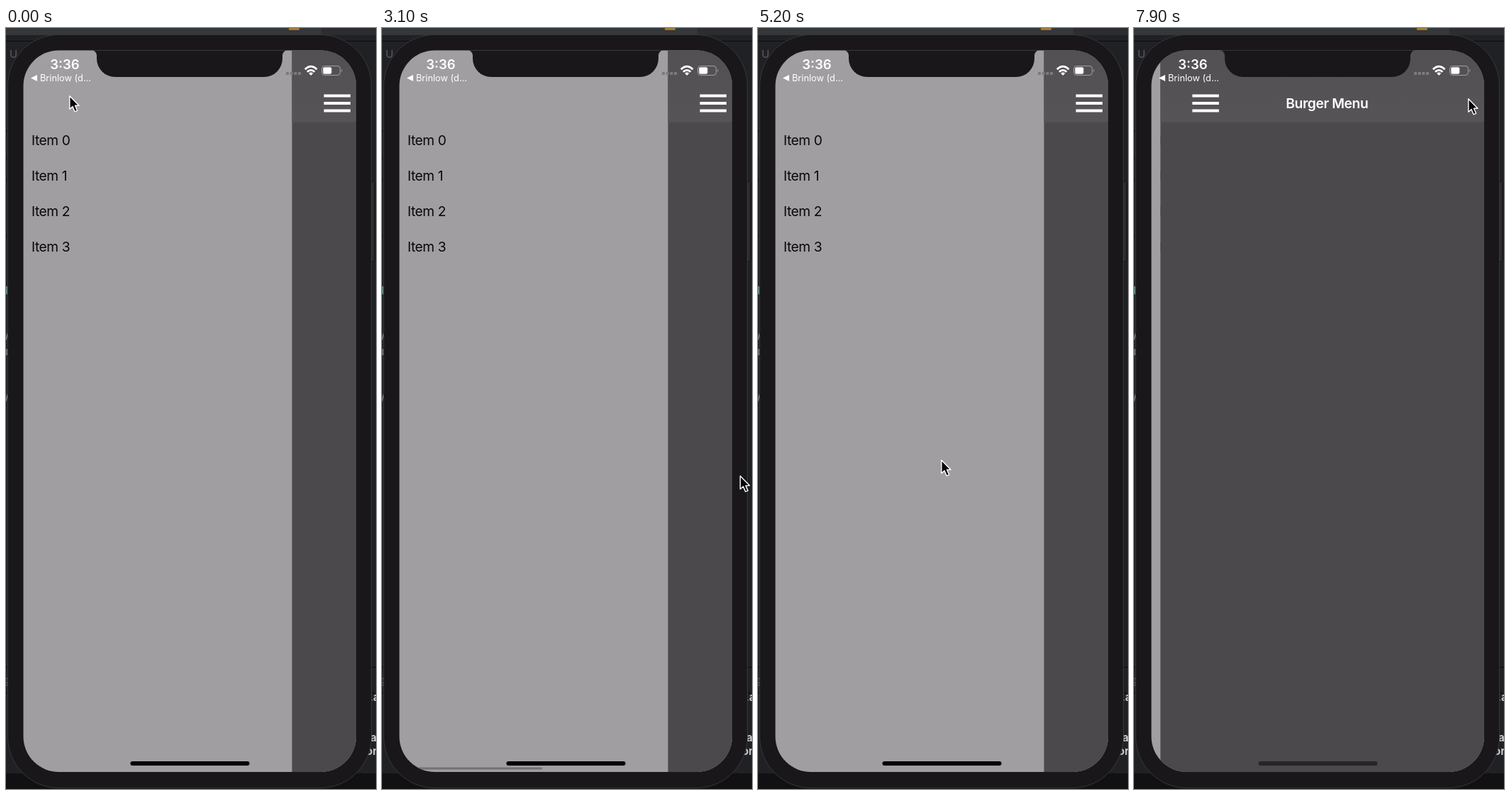
An HTML page that plays this animation: 522x1072 px, repeating every 8 s.

```html
<!DOCTYPE html>
<html lang="en">
<head>
<meta charset="utf-8">
<title>Side menu</title>
<style>
  html, body { margin: 0; width: 100%; height: 100%; overflow: hidden; background: #202125; }
  svg { display: block; width: 522px; height: 1072px; }
  text { font-family: Inter, Roboto, sans-serif; }
  .row { font-size: 19.2px; letter-spacing: -.45px; fill: #080709; }
  .bold { font-weight: 600; fill: #fff; }
  .edge { font-size: 15px; fill: #8d8d90; }
  .dim { fill: #5d5d61; }
  .bright { font-weight: 700; fill: #c8c8ca; }
</style>
</head>
<body>
<svg viewBox="0 0 522 1072">
  <defs>
    <clipPath id="screen"><rect x="24.5" y="31.5" width="469.5" height="1016.5" rx="50"/></clipPath>
    <linearGradient id="bar" x1="0" y1="0" x2="0" y2="1">
      <stop offset="0" stop-color="#525053"/><stop offset="1" stop-color="#565457"/>
    </linearGradient>
  </defs>

  <!-- desktop behind the phone -->
  <rect width="522" height="1072" fill="#202125"/>
  <rect width="445" height="10" fill="#34383a"/>
  <rect x="445" width="77" height="10" fill="#2b2d31"/>
  <rect x="399" width="15" height="3" rx="1" fill="#a87a2c"/>
  <path d="M0 18.5H522M0 145.5H4M0 183.5H4M0 214.5H4M0 293.5H4M0 900.5H522M0 936.5H522" stroke="#0b0b0d"/>
  <rect y="1050" width="522" height="22" fill="#111114"/>
  <rect y="364" width="3" height="11" fill="#4d8479"/>
  <g class="edge">
    <text class="dim" x="5" y="42">U</text>
    <text x="-11" y="440">W</text>
    <text x="-6" y="461">u</text>
    <text x="-11" y="526">W</text>
    <text class="dim" x="-5" y="924">g</text>
    <text class="bright" x="513" y="948">.a</text>
    <text class="bright" x="514" y="1005">a</text>
    <text class="bright" x="508" y="1024">or</text>
  </g>
  <rect x="511" y="216" width="9" height="113" rx="2" fill="#2c2c2f" stroke="#111113"/>

  <!-- phone -->
  <rect x="2.5" y="9.5" width="513" height="1061" rx="72" fill="#19171a" stroke="#38373a"/>
  <g clip-path="url(#screen)">
    <rect x="24" y="31" width="471" height="1018" fill="#a09ea1"/>
    <g id="list"></g>
    <rect id="thumb" y="1041.5" width="195" height="3" rx="1.5" fill="#656366"/>
    <g id="main">
      <rect x="24.5" y="31" width="471" height="1018" fill="#4b494c"/>
      <rect x="24.5" y="31" width="471" height="101.5" fill="url(#bar)"/>
      <path d="M69.5 95.5h37.5m-37.5 10.5h37.5m-37.5 10.5h37.5" stroke="#fff" stroke-width="4"/>
      <text class="bold" x="259.5" y="113" text-anchor="middle" font-size="19.3" letter-spacing="-.4">Burger Menu</text>
    </g>
    <path d="M120 31a8 8 0 0 1 8 8v4a26 26 0 0 0 26 26h210a26 26 0 0 0 26-26v-4a8 8 0 0 1 8-8z" fill="#19171a"/>
    <text class="bold" x="83" y="57.5" text-anchor="middle" font-size="18.6">3:36</text>
    <path d="M35 70.5l9-4.5v9z" fill="#fff"/>
    <text x="48" y="75" font-size="12.8" fill="#fff">Brinlow (d...</text>
    <path d="M395 64h22" stroke="#7d7b7e" stroke-width="4" stroke-dasharray="4 1.7"/>
    <path d="M421.8 58.2q8.4-8 16.8 0M425 61.8q5.2-5 10.4 0" fill="none" stroke="#fff" stroke-width="2.7"/>
    <path d="M430.2 67l-3-3.2q3-2.4 6 0z" fill="#fff"/>
    <rect x="445.5" y="53.5" width="26" height="13" rx="3.8" fill="none" stroke="#a3a1a4"/>
    <path d="M473.3 58q2.2 2 0 4z" fill="#a3a1a4"/>
    <rect x="447.3" y="55.3" width="12" height="9.4" rx="2" fill="#fff"/>
    <rect id="home" x="175.5" y="1033" width="168" height="6" rx="3"/>
  </g>
  <path id="cursor" d="M.8.8V19.3L5 15.6 8.1 22.8 11.6 21.3 8.5 14.3H14Z" fill="#050505" stroke="#fff" stroke-width="1.4" stroke-linejoin="round"/>
</svg>
<script>
  const LOOP = 8000, STEP = 100, LEFT = 24.5, OPEN = 379;
  const $ = id => document.getElementById(id);
  const clamp = p => Math.min(1, Math.max(0, p));

  // eased 0..1 between two times
  function ramp(t, from, to) {
    const p = clamp((t - from) / (to - from));
    return p * p * (3 - 2 * p);
  }

  // the menu slides for 200 ms, quadratic in and out
  function slide(t, start) {
    const p = clamp((t - start) / 200);
    return p < .5 ? 2 * p * p : 1 - 2 * (1 - p) ** 2;
  }

  const openness = t => 1 - slide(t, 3849.6) + slide(t, 4750) - slide(t, 7726);

  // two swipes to the second page and one back, then one each way
  const scroll = t =>
    240 * ramp(t, 900, 1150) + 294 * ramp(t, 1250, 2000) - 534 * ramp(t, 2186, 3000) +
    540 * ramp(t, 5700, 6250) - 131 * ramp(t, 6300, 6600) - 409 * ramp(t, 6700, 7400);

  const thumbAlpha = t =>
    ramp(t, 900, 1000) - ramp(t, 3000, 3300) + ramp(t, 5700, 5800) - ramp(t, 7300, 7500);

  // hand movements: start, end, destination
  const moves = [
    [0, 600, 390, 652], [900, 1100, 150, 655], [1250, 1500, 434, 660], [1500, 2000, 330, 664],
    [2186, 2640, 508, 672], [3000, 3600, 462, 109], [4000, 4400, 82, 107],
    [4850, 5200, 258, 608], [5200, 5600, 488, 622], [5700, 6000, 200, 618],
    [6200, 6600, 405, 616], [6700, 6900, 508, 600], [6900, 7500, 471, 99]
  ];

  function pointer(t) {
    let x = 89, y = 95;
    for (const [from, to, toX, toY] of moves) {
      const p = ramp(t, from, to);
      x += (toX - x) * p;
      y += (toY - y) * p;
    }
    return [x, y];
  }

  for (const [label, x] of [["Item", 36], ["Another Item", 585]])
    for (let i = 0; i < 4; i++) {
      const row = document.createElementNS("http://www.w3.org/2000/svg", "text");
      row.setAttribute("class", "row");
      row.setAttribute("x", x);
      row.setAttribute("y", 164.5 + 50 * i);
      row.textContent = label + " " + i;
      $("list").append(row);
    }

  function move(id, x, y = 0) {
    $(id).setAttribute("transform", `translate(${x} ${y})`);
  }

  function draw(t) {
    const shift = OPEN * openness(t), offset = scroll(t);
    move("main", shift);
    move("list", -offset);
    move("cursor", ...pointer(t));
    $("thumb").setAttribute("x", 31 + .416 * offset);
    $("thumb").setAttribute("opacity", thumbAlpha(t));
    $("home").setAttribute("fill", LEFT + shift > 200 ? "#000" : "#272528");
  }

  const begin = performance.now();
  function tick() {
    const t = (performance.now() - begin) % LOOP;
    draw(Math.floor(t / STEP) * STEP);
    requestAnimationFrame(tick);
  }
  tick();
</script>
</body>
</html>
```
